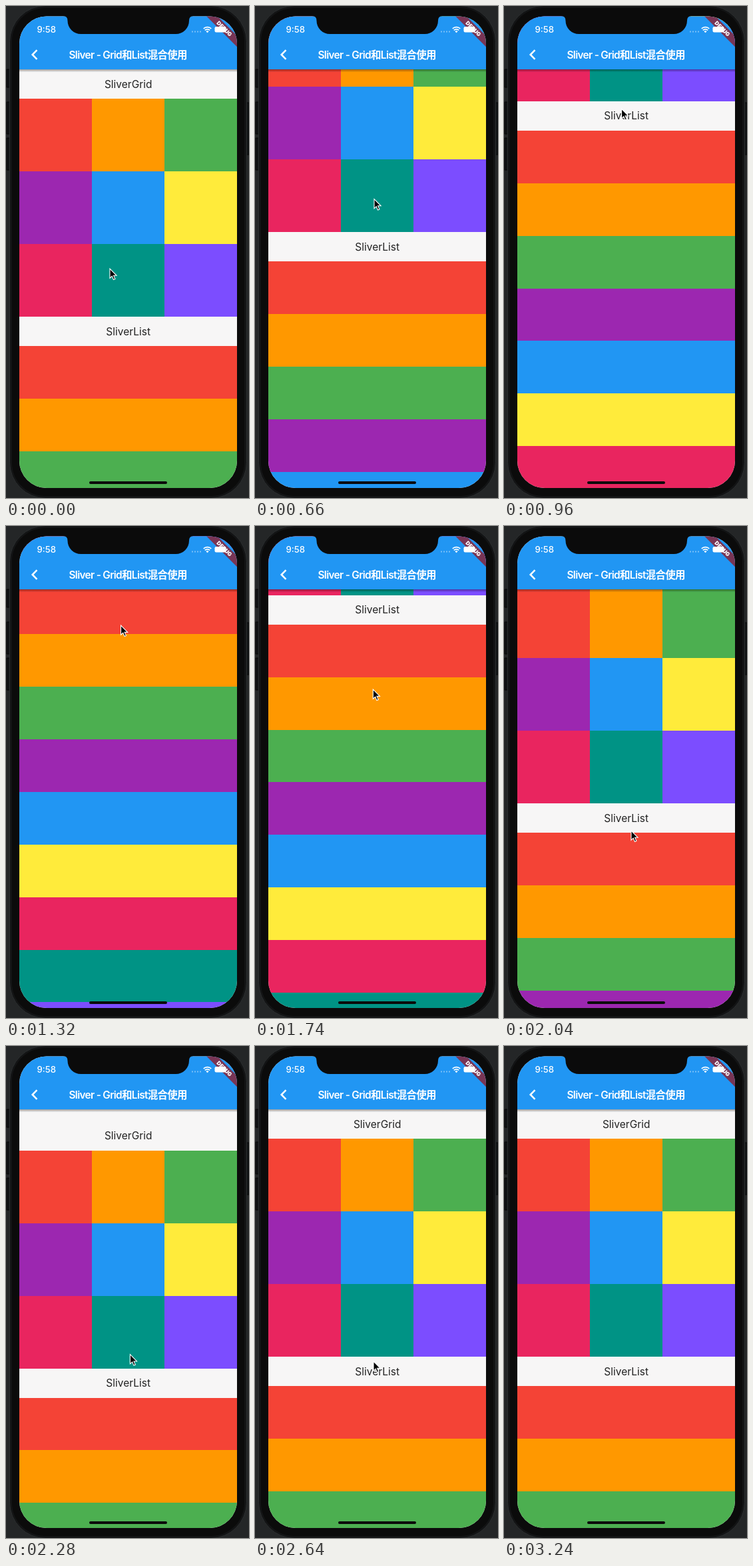
An HTML page for the animation above (3360 ms loop, 365 by 738 pixels).

```html
<!DOCTYPE html>
<html lang="zh">
<head>
<meta charset="utf-8">
<title>Sliver</title>
<style>
html, body { margin: 0; width: 100%; height: 100%; overflow: hidden; background: #242627; }
svg { display: block; font-family: Inter, "Noto Sans CJK SC", "Noto Sans CJK", sans-serif; }
text { text-anchor: middle; }
</style>
</head>
<body>
<svg width="365" height="738" viewBox="0 0 365 738">
  <defs>
    <clipPath id="screen"><rect x="20" y="15.5" width="327" height="707.5" rx="41"/></clipPath>
    <linearGradient id="shade" x2="0" y2="1">
      <stop stop-opacity=".36"/>
      <stop offset="1" stop-opacity="0"/>
    </linearGradient>
  </defs>

  <!-- phone body and side buttons -->
  <path d="M1 95h6v27H1zM1 144h6v48H1zM1 198h6v48H1zM359 145h6v78h-6z" fill="#111314" stroke="#070707"/>
  <rect x="5.5" y="-.5" width="356" height="739" rx="54" fill="#131415" stroke="#2c2f30"/>
  <rect x="9" y="3" width="349" height="732" rx="50" fill="#0b0b0b"/>

  <g clip-path="url(#screen)">
    <rect x="20" y="15" width="327" height="709" fill="#f7f6f6"/>
    <g id="content" font-size="15.5" fill="#222" shape-rendering="crispEdges"></g>
    <rect x="20" y="95" width="327" height="4.5" fill="url(#shade)"/>
    <rect x="20" y="15" width="327" height="80" fill="#2196f3"/>
    <path d="M46.5 66.2 39.7 73l6.8 6.8" fill="none" stroke="#fff" stroke-width="2.5"/>
    <text x="183.2" y="78.5" font-size="15.5" font-weight="600" letter-spacing="-.72" fill="#fff">Sliver - Grid和List混合使用</text>

    <g transform="translate(328 34) rotate(45)">
      <rect x="-50" y="-5.800" width="100" height="11.600" fill="#96141e" fill-opacity=".74"/>
      <text y="3" font-size="8.200" font-weight="900" fill="#fff">DEBUG</text>
    </g>

    <!-- status bar -->
    <g fill="#fff">
      <text x="60.800" y="40.300" font-size="13.200" font-weight="500">9:58</text>
      <path d="M279 38.500h14" stroke="#fff" stroke-opacity=".4" stroke-width="2" stroke-dasharray="2 2"/>
      <path d="M302.500 40.200l-2.100-2.200a3 3 0 0 1 4.200 0z"/>
      <path d="M298.800 36.400a5.200 5.200 0 0 1 7.400 0M296.700 34a8.200 8.200 0 0 1 11.600 0" fill="none" stroke="#fff" stroke-width="1.700"/>
      <rect x="313.500" y="31" width="17" height="8.500" rx="2.300"/>
      <rect x="331.300" y="33.600" width="1.300" height="3.300" rx=".6" fill-opacity=".6"/>
    </g>
    <rect x="125" y="713" width="117" height="4" rx="2" fill="#0b0b0b"/>
  </g>

  <path d="M86 15q6.500 0 6.500 7a20 20 0 0 0 20 20H255a20 20 0 0 0 20-20q0-7 6.500-7z" fill="#0b0b0b"/>
  <path id="cursor" d="M0 0V14.200l3.200-3 2.300 5.300 2.400-1-2.300-5.200h4.500z" stroke="#fff" stroke-width="1.100"/>
</svg>
<script>
const LOOP = 3360, STEP = 60;
const LEFT = 20, TOP = 95, HEAD = 44, CELL = 109, ROW = 78.9;
const MAX_SCROLL = 497;
const colors = ["#f44336", "#ff9800", "#4caf50", "#9c27b0", "#2196f3",
                "#ffeb3b", "#e9255f", "#009385", "#7c4dff"];
const content = document.getElementById("content");
const cursor = document.getElementById("cursor");

function add(tag, attrs, label = "") {
  const node = document.createElementNS("http://www.w3.org/2000/svg", tag);
  for (const key in attrs) node.setAttribute(key, attrs[key]);
  node.textContent = label;
  content.append(node);
}

const block = (x, y, width, height, fill) => add("rect", { x, y, width, height, fill });
const heading = (y, label) => add("text", { x: 183.7, y: y + 27.6 }, label);

const listTop = TOP + HEAD + 3 * CELL;
heading(TOP, "SliverGrid");
heading(listTop, "SliverList");
colors.forEach((fill, i) => {
  block(LEFT + i % 3 * CELL, TOP + HEAD + Math.floor(i / 3) * CELL, CELL, CELL, fill);
  block(LEFT, listTop + HEAD + i * ROW, 3 * CELL, ROW, fill);
});

const progress = (t, from, to) => Math.min(1, Math.max(0, (t - from) / (to - from)));
const smooth = u => u * u * (3 - 2 * u);

// Fling up with friction, drag back down, then a small bounce past the top
function scrollAt(t) {
  const fling = MAX_SCROLL * (1 - Math.exp(-Math.max(0, t - 543) / 397));
  const back = smooth(progress(t, 1547, 2162));
  const bounce = 18 * Math.sin(Math.PI * progress(t, 2100, 2520));
  return fling * (1 - back) - bounce;
}

// Places where the hand pauses: time and pointer tip
const stops = [
  { at: 0, x: 156, y: 394 },
  { at: 480, x: 181, y: 424 },
  { at: 840, x: 177, y: 155 },
  { at: 1560, x: 171, y: 147 },
  { at: 2040, x: 191, y: 457 },
  { at: 2640, x: 178, y: 473 },
  { at: 2880, x: -60, y: 760 },
];

function pointerAt(t) {
  const next = Math.max(1, stops.findIndex(stop => stop.at > t));
  const b = t < stops.at(-1).at ? stops[next] : stops.at(-1);
  const a = stops[stops.indexOf(b) - 1];
  const u = smooth(progress(t, a.at, b.at));
  return [a.x + (b.x - a.x) * u, a.y + (b.y - a.y) * u];
}

const start = performance.now();
function draw() {
  const elapsed = Math.max(0, performance.now() - start) % LOOP;
  const t = Math.floor(elapsed / STEP) * STEP;
  content.setAttribute("transform", `translate(0 ${-scrollAt(t)})`);
  cursor.setAttribute("transform", `translate(${pointerAt(t)})`);
  requestAnimationFrame(draw);
}
draw();
</script>
</body>
</html>
```
